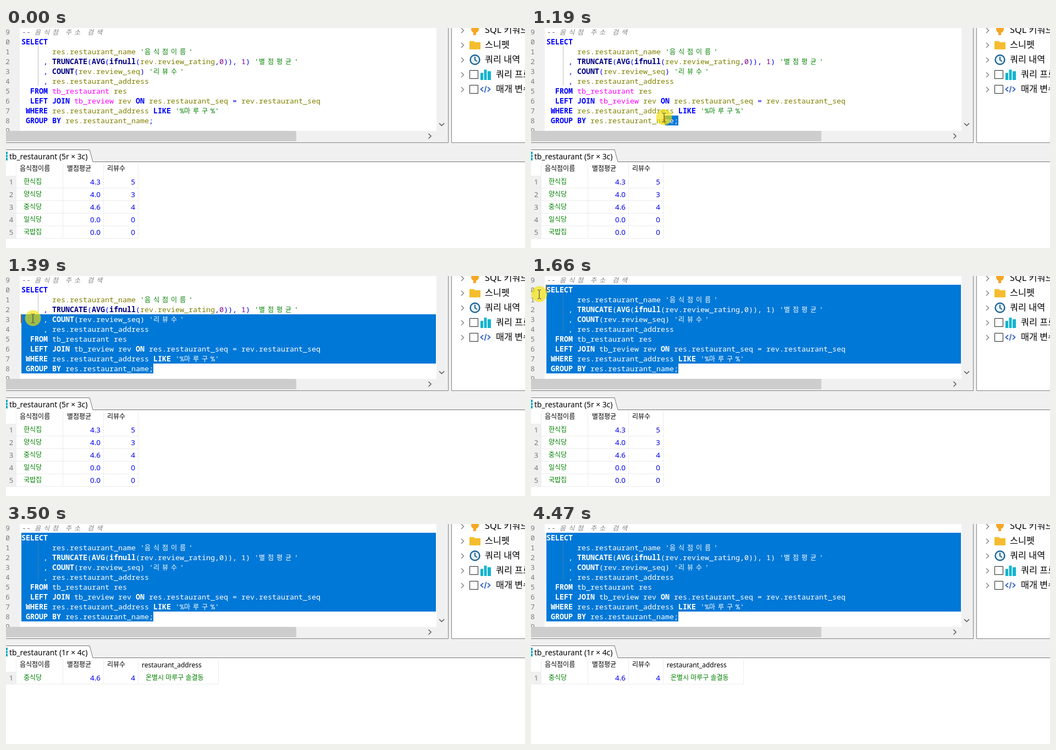
These frames come from a looping animation (944x402 px, 5080 ms). An HTML page:

```html
<!DOCTYPE html>
<html lang="ko">
<head>
<meta charset="utf-8">
<title>SQL query</title>
<style>
html, body { margin: 0; width: 100%; height: 100%; overflow: hidden; background: #fff; }
svg { display: block; width: 944px; height: 402px; }
text { font: 12px "Noto Sans", "Noto Sans CJK KR", "Noto Sans CJK", sans-serif; white-space: pre; }
.code text { font: 13.33px "Noto Sans Mono", "Noto Sans CJK KR", "Noto Sans CJK", monospace; }
.code .hangul { font-size: 12px; }
.code .keyword { fill: #00f; font-weight: 700; }
.code .func { fill: #000080; font-weight: 700; }
.code .string { fill: #008000; }
.code .table { fill: #f0f; }
.code .ident { fill: #808000; }
.code .number { fill: #800080; }
.code .punct { fill: #00f; }
.code .comment { fill: #808080; font-style: italic; }
.code.selected text { fill: #fff; }
.code .lineno { fill: #808080; }
.tree text { font-size: 16.3px; }
.tab { font-size: 13.8px; }
.num { font-size: 13.4px; fill: #00e; text-anchor: end; }
.rowno { font-size: 13px; fill: #777; text-anchor: middle; }
.name { fill: #008000; }
.chevron { fill: none; stroke: #888; stroke-width: 1.5; }
.dark { stroke: #555; }
</style>
</head>
<body>
<svg viewBox="0 0 944 402">
  <defs><clipPath id="selClip"><path id="selPath"/></clipPath></defs>
  <rect width="944" height="402" fill="#fff"/>

  <rect width="25" height="188" fill="#f0f0f0"/>
  <g class="code" id="numbers"></g>
  <g class="code" id="plain"></g>
  <g clip-path="url(#selClip)">
    <rect width="783" height="188" fill="#0078d7"/>
    <g class="code selected" id="chosen"></g>
  </g>
  <path d="M58.5 34V106" stroke="#808080" stroke-dasharray="1 1"/>
  <g id="caret"><rect width="1" height="16" fill="#222"/><rect x="1" width="1" height="16" fill="#ff8728"/></g>

  <path d="M783 0H810V209H944V244H0V188H783Z" fill="#f0f0f0"/>
  <rect y="188" width="528" height="19" fill="#cdcdcd"/>
  <path class="chevron dark" d="M788 174l4.5 4.5 4.5-4.5M768.5 193l4.5 4.5-4.5 4.5"/>
  <path d="M0 209.5H804.5V0M944 209.5H810.5V0" fill="none" stroke="#828282"/>

  <g class="tree" id="tree">
    <g fill="#f5a623"><circle cx="853" cy="2" r="7"/><rect x="850" y="4" width="5" height="9"/></g>
    <path d="M843 24h8l2 2h10v13h-20z" fill="#f5bd2e"/>
    <circle cx="853" cy="58" r="8.5" fill="#e8f5fb" stroke="#1f6593" stroke-width="2.4"/>
    <path d="M853 52.5V58.5L857 61" fill="none" stroke="#1f6593" stroke-width="2"/>
    <path d="M863 82h5v13h-5zM869.5 76h5v19h-5zM876 79h6v16h-6z" fill="#10b4d0"/>
    <path d="M868 108l-4.5 4 4.5 4M876 108l4.5 4-4.5 4M873.5 106l-3 12" fill="none" stroke="#3565c4" stroke-width="1.8"/>
    <path d="M843.5 77.5h15v15h-15zM843.5 104.5h15v15h-15z" fill="#fff" stroke="#222"/>
  </g>

  <path d="M0 222.5H152L158 245H0Z" fill="#fff"/>
  <path d="M0 222.5H152L158 244.5H944" fill="none" stroke="#777"/>
  <path d="M0 226h3v16h-3z" fill="#18a9c4"/>
  <path d="M0 231.5h3M0 236.5h3" stroke="#fff"/>
  <g id="before"></g>
  <g id="after"></g>

  <g id="pointer">
    <circle r="14.5" fill="#f4e000" opacity=".65"/>
    <path id="beam" d="M-3-7.5H-1L0-6.5 1-7.5H3M0-6.5V7.5M-3 8.5H-1L0 7.5 1 8.5H3" fill="none" stroke="#333"/>
    <path id="arrow" d="M0 0V16L4 12.5 6.5 18.5 9 17.5 6.5 11.5H11.5Z" fill="#fff" stroke="#000"/>
  </g>
</svg>
<script>
const $ = id => document.getElementById(id);
const LOOP = 5080, LEFT = 28, TOP = 16, ROW = 18, COL = 8, LAST = 8, END = 268;

function add(parent, tag, attrs, content = '') {
  const el = document.createElementNS('http://www.w3.org/2000/svg', tag);
  for (const key in attrs) el.setAttribute(key, attrs[key]);
  el.textContent = content;
  parent.appendChild(el);
}
const label = (parent, x, y, content, cls = '') => add(parent, 'text', { x, y, class: cls }, content);

// Editor
const sql = `-- 음식점 주소 검색
SELECT
       res.restaurant_name '음식점이름'
     , TRUNCATE(AVG(ifnull(rev.review_rating,0)), 1) '별점평균'
     , COUNT(rev.review_seq) '리뷰수'
     , res.restaurant_address
  FROM tb_restaurant res
  LEFT JOIN tb_review rev ON res.restaurant_seq = rev.restaurant_seq
 WHERE res.restaurant_address LIKE '%마루구%'
 GROUP BY res.restaurant_name;`.split('\n');

function kind(token) {
  if (token.startsWith('--')) return 'comment';
  if (token[0] === "'") return 'string';
  if (/^(SELECT|FROM|LEFT|JOIN|ON|WHERE|LIKE|GROUP|BY)$/.test(token)) return 'keyword';
  if (/^(TRUNCATE|AVG|ifnull|COUNT)$/.test(token)) return 'func';
  if (token.startsWith('tb_')) return 'table';
  if (/^\d/.test(token)) return 'number';
  return /^[a-z]/.test(token) ? 'ident' : 'punct';
}

// Hangul takes two columns of the character grid.
function drawCode(parent) {
  sql.forEach((line, i) => {
    let x = LEFT;
    for (const token of line.match(/--.*|'[^']*'|[\w.]+| +|[^\w\s]+/g)) {
      for (const run of token.match(/[가-힣]+|[^가-힣]+/g)) {
        const wide = /[가-힣]/.test(run), step = wide ? 2 * COL : COL;
        const xs = [...run].map((_, n) => x + n * step);
        if (run.trim()) label(parent, xs.join(' '), TOP + ROW * (i - 1) + 14, run, kind(token) + (wide ? ' hangul' : ''));
        x += run.length * step;
      }
    }
  });
}
drawCode($('plain'));
drawCode($('chosen'));
for (let i = -1; i <= 9; i++) label($('numbers'), -1, TOP + ROW * i + 14, (i + 10) % 10, 'lineno');

// Side panel
['SQL 키워드', '스니펫', '쿼리 내역', '쿼리 프로파일', '매개 변수'].forEach((item, i) => {
  const y = 3 + 27 * i;
  label($('tree'), i < 3 ? 871 : 891, y + 5.5, item);
  add($('tree'), 'path', { class: 'chevron', d: `M828 ${y - 3}l4.5 4.5-4.5 4.5` });
});

// Result grids
function drawGrid(parent, title, rows, address) {
  const bottom = 269.5 + 23 * rows.length;
  const edges = [18.5, 103.5, 177.5, 240.5].concat(address ? 386.5 : []);
  const right = edges[edges.length - 1];
  label(parent, 6, 240, title, 'tab');
  add(parent, 'rect', { y: 270, width: 18, height: bottom - 270, fill: '#f0f0f0' });
  edges.forEach(x => add(parent, 'path', { d: `M${x} 247V${bottom}`, stroke: '#ececec' }));
  label(parent, 25, 261, '음식점이름');
  label(parent, 111, 261, '별점평균');
  label(parent, 184, 261, '리뷰수');
  rows.forEach(([name, rating, count], i) => {
    const y = 286 + 23 * i;
    add(parent, 'path', { d: `M0 ${y + 6.5}H${right}`, stroke: '#ececec' });
    label(parent, 9.5, y, i + 1, 'rowno');
    label(parent, 32, y - 1, name, 'name');
    label(parent, 172, y, rating, 'num');
    label(parent, 235, y, count, 'num');
  });
  if (address) {
    label(parent, 247, 262, 'restaurant_address');
    label(parent, 254, 285, address, 'name');
  }
}
const chinese = ['중식당', '4.6', 4];
drawGrid($('before'), 'tb_restaurant (5r × 3c)',
  [['한식집', '4.3', 5], ['양식당', '4.0', 3], chinese, ['일식당', '0.0', 0], ['국밥집', '0.0', 0]]);
drawGrid($('after'), 'tb_restaurant (1r × 4c)', [chinese], '온별시 마루구 솔결동');

// Pointer paths: [time, x, y]
const paths = [
  [[310, 793, 360], [480, 640, 230], [620, 450, 142], [720, 330, 131], [810, 283, 173], [940, 283, 173],
   [1190, 242, 163], [1220, 240, 161], [1390, 49, 77], [1450, 33, 63], [1660, 15, 33], [1760, 10, 28],
   [1960, 10, 28], [2090, -18, 26]],
  [[3630, 250, 342], [3800, 420, 330], [4020, 712, 270], [4060, 730, 250], [4200, 800, 290], [4440, 888, 420]]
];

function pointerAt(t) {
  for (const path of paths) {
    const n = path.findIndex(p => p[0] > t);
    if (n < 1) continue;
    const [t0, x0, y0] = path[n - 1], [t1, x1, y1] = path[n];
    const k = (t - t0) / (t1 - t0);
    return [x0 + (x1 - x0) * k, y0 + (y1 - y0) * k];
  }
  return null;
}

function selectTo(x, y) {
  const row = Math.max(0, Math.min(LAST, Math.floor((y - TOP) / ROW)));
  const caretX = x < 60 ? LEFT : Math.min(END, LEFT + Math.ceil((x - LEFT) / COL) * COL);
  const top = TOP + row * ROW, lastTop = TOP + LAST * ROW, bottom = lastTop + ROW;
  $('selPath').setAttribute('d', row === LAST
    ? `M${caretX} ${top}H${END}V${bottom}H${caretX}Z`
    : `M${caretX} ${top}H782V${lastTop}H${END}V${bottom}H${LEFT}V${top + ROW}H${caretX}Z`);
  $('caret').setAttribute('transform', `translate(${caretX - 1} ${top})`);
}

const show = (id, on) => { $(id).style.display = on ? '' : 'none'; };

function draw() {
  const t = performance.now() % LOOP;
  const pos = pointerAt(t);
  show('pointer', pos);
  if (pos) {
    const [x, y] = pos, inEditor = x < 783 && y < 188;
    $('pointer').setAttribute('transform', `translate(${Math.round(x)} ${Math.round(y)})`);
    show('beam', inEditor);
    show('arrow', !inEditor);
  }
  if (t < 940) $('selPath').setAttribute('d', '');
  else selectTo(...pointerAt(Math.min(t, 1760)));
  show('caret', (t >= 940 && t < 2290) || (t >= 2830 && t < 3500));
  show('before', t < 2900);
  show('after', t >= 2900);
  requestAnimationFrame(draw);
}
draw();
</script>
</body>
</html>
```
